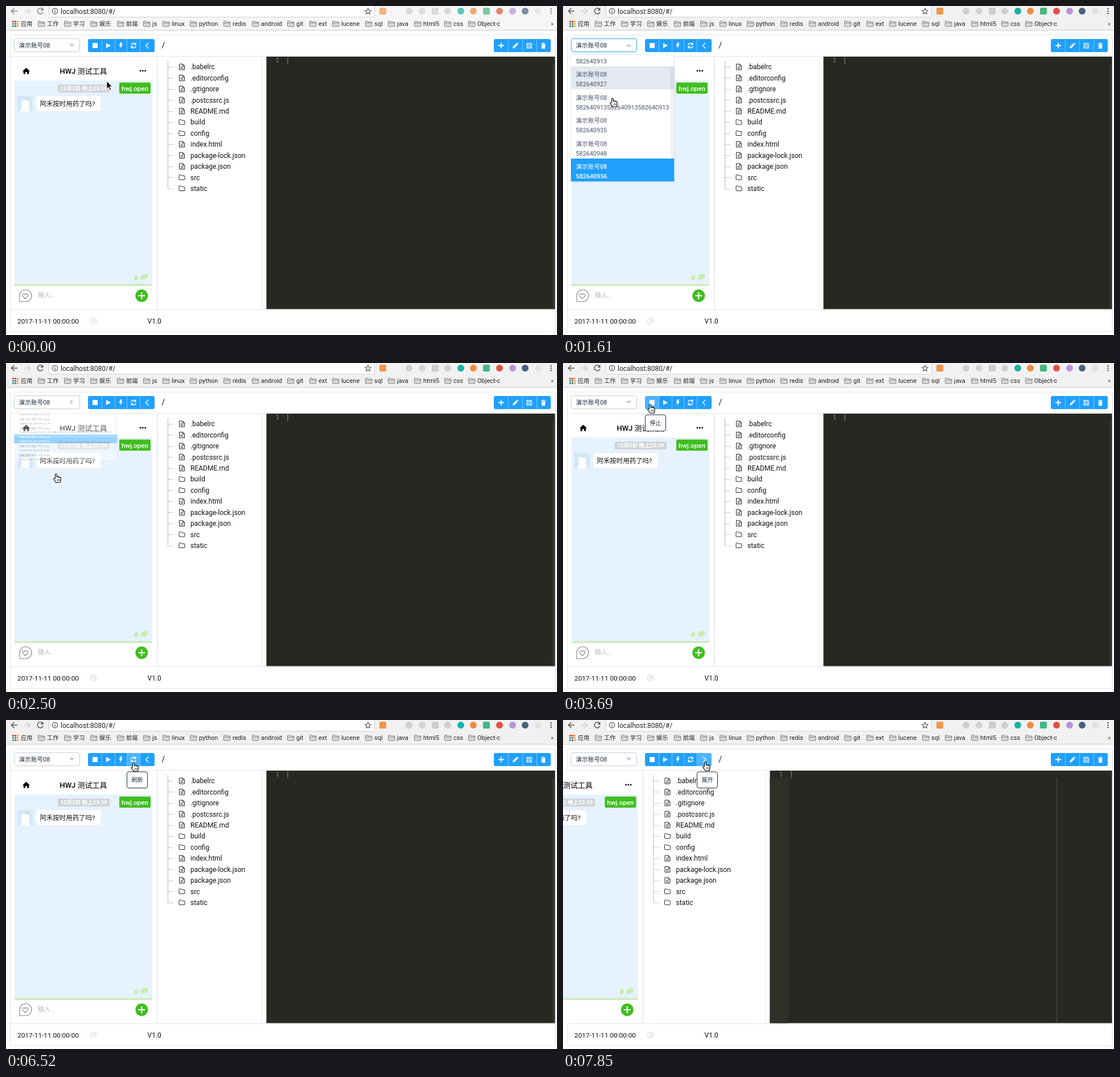
Write an HTML page that moves like this. It is 968 px wide and 578 px high and loops after 8000 ms.

```html
<!DOCTYPE html>
<html lang="zh-CN">
<head>
<meta charset="utf-8">
<title>测试工具</title>
<style>
html, body { margin: 0; width: 100%; height: 100%; overflow: hidden; background: #fff; }
svg { display: block; width: 968px; height: 578px; }
text { font-family: Roboto, "Noto Sans CJK SC", "Noto Sans CJK", sans-serif; white-space: pre; }
.mono { font-family: "Noto Sans Mono", "DejaVu Sans Mono", monospace; }
</style>
</head>
<body>
<svg id="stage" viewBox="0 0 968 578" xmlns="http://www.w3.org/2000/svg"></svg>
<script>
const BLUE = '#20a0ff', HOVER = '#4db3ff', PRESS = '#1d90e6', LINE = '#dfe6ee';
const USER = '演示账号08', APP = 'hwj';
const IDS = ['582640913', '582640927', '582640913'.repeat(3), '582640935', '582640948', '582640956'];

// Markup helpers; text is placed by its vertical centre
const text = (x, y, s, size = 12, fill = '#111', more = '') =>
  `<text x="${x}" y="${y + size * 0.36}" font-size="${size}" fill="${fill}" ${more}>${s}</text>`;
const rect = (x, y, w, h, fill, more = '') =>
  `<rect x="${x}" y="${y}" width="${w}" height="${h}" fill="${fill}" ${more}/>`;
const dot = (x, y, r, fill, more = '') => `<circle cx="${x}" cy="${y}" r="${r}" fill="${fill}" ${more}/>`;
const fill = (d, color, more = '') => `<path d="${d}" fill="${color}" ${more}/>`;
const pen = (d, color, w = 1, more = '') =>
  `<path d="${d}" fill="none" stroke="${color}" stroke-width="${w}" ${more}/>`;
const at = (x, y, body) => `<g transform="translate(${x} ${y})">${body}</g>`;
const group = (id, body, more = '') => `<g id="${id}" ${more}>${body}</g>`;
const MID = 'text-anchor="middle"';

function browser() {
  const logos = [
    [662, '#f0954a', 1], [708, '#cfcfcf'], [731, '#d4d4d4'], [754, '#cdcdcd', 1], [776, '#cfcfcf'],
    [799, '#17b3a3'], [821, '#f08b3d'], [844, '#42b883', 1], [867, '#e4503f'], [890, '#b795dc'],
    [912, '#48627f'], [935, '#e2e2e2']
  ].map(([x, c, square]) => square ? rect(x - 6, 3, 12, 12, c, 'rx="2"') : dot(x, 9, 6, c)).join('');
  const tools =
    pen('M20 9H10M14.500 4L9.500 9L14.500 14', '#555', 1.5) +
    pen('M32 9H42M37.500 4L42.500 9L37.500 14', '#ccc', 1.5) +
    pen('M64.500 6A5 5 0 1 0 65 10.500', '#555', 1.5) + fill('M65.500 3V8H60.500Z', '#555') +
    logos + [5, 9, 13].map(y => dot(957.5, y, 1.3, '#555')).join('');
  const folders = {
    工作: 72, 学习: 118, 娱乐: 164, 前端: 211, js: 257, linux: 291, python: 339, redis: 398,
    android: 448, git: 510, ext: 549, lucene: 589, sql: 647, java: 687, html5: 733, css: 786, 'Object-c': 828
  };
  const marks = Object.entries(folders).map(([name, x]) =>
    at(x - 16, 26, fill('M.5 1.500Q.5.500 1.500.500H4.500L6 2H11Q12 2 12 3V9Q12 10 11 10H1.500Q.5 10 .5 9Z', '#d9d9d9',
      'stroke="#777" stroke-width=".9"') + pen('M.5 4H12', '#777', 0.8)) +
    text(x, 31.5, name, /[a-z]/.test(name) ? 11 : 10.2, '#222')).join('');
  const apps = ['#e0483b', '#e0483b', '#f2a93b', '#4aa25a', '#3e7fe8', '#f2a93b', '#4aa25a', '#3e7fe8', '#f2a93b']
    .map((c, i) => rect(11 + i % 3 * 4, 26 + Math.floor(i / 3) * 4, 3, 3, c)).join('');
  return rect(0, 0, 968, 42, '#f1f1f1', 'id="chrome"') + rect(0, 42, 968, 1, '#c9c9c9') +
    rect(75.5, -6, 572, 25.5, '#fff', 'rx="3" stroke="#cfcfcf"') + group('tools', tools) +
    dot(86, 9, 4.8, 'none', 'stroke="#555" stroke-width="1.200"') + rect(85.4, 8, 1.3, 4, '#555') +
    rect(85.4, 5.8, 1.3, 1.3, '#555') + text(96, 9.5, 'localhost:8080/#/', 12, '#222') +
    pen('M636 4L637.500 7.500L641.300 7.800L638.400 10.300L639.300 14L636 12L632.700 14L633.600 10.300L630.700 7.800L634.500 7.500Z', '#555', 1.1) +
    apps + text(26, 31.5, '应用', 10.2, '#222') + marks + text(957, 31, '»', 11, '#444');
}

const BTN = [144, 168, 191, 212, 235, 261];
function bar() {
  const keys = BTN.slice(0, 5).map((x, i) => rect(x, 58, BTN[i + 1] - x, 23, BLUE, `id="btn${i}"`)).join('');
  const seps = [168, 191, 212, 235, 882, 907, 932].map(x => rect(x, 58, 1, 23, '#7cc6ff')).join('');
  const icons = rect(152, 65, 9, 9, '#fff') + fill('M176 65L184 69.500L176 74Z', '#fff') +
    fill('M201 64H204L202.500 67.800H205L200 75L201 70H198.500Z', '#fff') +
    pen('M219.800 68.500A4.300 4.300 0 0 1 227 66.500M228.200 70.500A4.300 4.300 0 0 1 221 72.500', '#fff', 1.5) +
    fill('M228.500 64V68.500H224ZM219.500 75V70.500H224Z', '#fff') +
    pen('', '#fff', 1.4, 'id="chevron"') +
    pen('M865 69.500H875M870 64.500V74.500', '#fff', 1.8) +
    fill('M890 74.500L890.800 71.300L896.500 65.600L899 68.100L893.300 73.800ZM897.200 64.900L898.200 63.900L900.700 66.400L899.700 67.400Z', '#fff') +
    pen('M915 65.500H922L923.500 67V74H915ZM917 65.500V68.500H921V65.500M917 74V71H921.500V74', '#fff', 1.1) +
    fill('M940 66H948V67.300H940ZM942.500 64.500H945.500V66H942.500ZM940.700 68H947.300L947 75H941Z', '#fff');
  return rect(14.5, 57.5, 115, 23, '#fff', 'id="select" rx="3" stroke="#bfcbd9"') +
    text(22.5, 69.5, USER, 10.7, '#1f2d3d') + fill('M-5 -2.500H5L0 2.500Z', '#bfcbd9', 'id="caret"') +
    `<g clip-path="url(#round)">${keys}</g>` + rect(857, 58, 100, 23, BLUE, 'rx="3"') + seps + icons +
    text(273.5, 69, '/', 14);
}

function chat() {
  const avatar = rect(20, 158, 27, 27, '#d3e8f8') +
    fill('M25 185Q27 180 28 176Q24 165 34 165Q43 165 40 176Q42 180 42 185Z', '#fff') +
    fill('M33 165Q34 161 40 162Q38 166 33 165Z', '#bfe5a0');
  return rect(7, 89, 1, 444, LINE) + rect(265, 89, 1.5, 444, LINE) +
    fill('M29 114.500L35.500 108.500L42 114.500H40.300V119.500H37V116H34V119.500H30.700V114.500Z', '#000') +
    text(136, 114.5, APP.toUpperCase() + ' 测试工具', 13, '#000', MID + ' font-weight="500"') +
    [236, 240.3, 244.6].map(x => dot(x, 113.7, 1.5, '#111')).join('') +
    rect(15, 131, 242, 361, '#e6f2fe') + rect(15, 488.5, 242, 3.5, '#cdecc0') +
    `<g fill="#c8edae"><ellipse cx="229" cy="477.500" rx="3.700" ry="4.700" transform="rotate(25 229 477)"/>
    <ellipse cx="243" cy="475.500" rx="7" ry="4.500" transform="rotate(-25 243 475)"/></g>` +
    pen('M237 479Q236 484 236.500 489', '#d3efc4') +
    rect(91, 138, 91, 14, '#d2d5d8', 'rx="2"') +
    text(136.5, 145, '12月2日 晚上23:39', 9.6, '#fff', MID + ' font-weight="700"') +
    rect(199, 134.5, 55, 19.5, '#3fbe1f', 'rx="2"') +
    text(226.5, 144.5, APP + '.open', 11.6, '#fff', MID + ' font-weight="500"') + avatar +
    rect(53, 158, 114, 27, '#fff', 'rx="2" stroke="#dfe9f2" stroke-width=".6"') +
    fill('M53.500 168.500L49.500 171.500L53.500 174.500Z', '#fff') + text(59.5, 172, '阿禾按时用药了吗?', 11.45) +
    pen('M24 519.500V509A10.500 10.500 0 1 1 34.500 519.500Z', '#8c8c8c', 1.2) +
    pen('M34 514.500L29.700 510Q28 506.500 31 505.500Q33 505.200 34 507.300Q35 505.200 37 505.500Q40 506.500 38.300 510Z', '#8c8c8c', 1.2) +
    text(56, 508.5, '输入...', 11, '#b5b5b5') +
    dot(238.3, 509, 11, '#3fbe1f') + pen('M232.300 509H244.300M238.300 503V515', '#fff', 2.2);
}

function tree() {
  const names = ['.babelrc', '.editorconfig', '.gitignore', '.postcssrc.js', 'README.md', 'build', 'config',
    'index.html', 'package-lock.json', 'package.json', 'src', 'static'];
  const file = pen('M.5.500H6.500L9.500 3.500V10.500H.5ZM6.500.500V3.500H9.500M2.500 5.500H7.500M2.500 8H7.500', '#222');
  const folder = pen('M.5 2Q.5 1 1.500 1H4L5.500 2.500H9.500Q10.500 2.500 10.500 3.500V8.500Q10.500 9.500 9.500 9.500H1.500Q.5 9.500 .5 8.500Z', '#222');
  return pen('M284.500 97V321', '#999', 1, 'stroke-dasharray="1.500 .7"') + names.map((name, i) => {
    const y = 107 + i * 19.42;
    return pen(`M285 ${Math.round(y) + 0.5}H295`, '#999', 1, 'stroke-dasharray="1 1"') +
      (name.includes('.') ? at(304, y - 5.5, file) : at(303.5, y - 5.5, folder)) + text(324, y, name);
  }).join('');
}

const ROW = 40.5, TOP = 65.5;
function menu() {
  const rows = IDS.map((id, i) => {
    const y = TOP + i * ROW;
    return `<g id="row${i}">` + rect(14, y, 181.5, ROW, '#fff') +
      text(22.5, y + 14.3, USER, 10.7, 'inherit') + text(22.5, y + 31.5, id, 10.8, 'inherit') + '</g>';
  }).join('');
  return rect(15, 88, 181.5, 222, '#000', 'rx="2" opacity=".08"') +
    rect(14, 86, 181.5, 222.5, '#fff', 'rx="2" stroke="#d1dbe5"') +
    `<g clip-path="url(#list)">${rows}${rect(189, 106, 6, 161, '#8a94a6', 'opacity=".13"')}</g>`;
}

// label, left edge, fade-in start and end, fade-out start and end
const TIPS = [
  ['停止', 144, 3390, 3600, 4300, 4500],
  ['运行', 168, 4450, 4700, 5000, 5300],
  ['事件', 191, 4950, 5200, 6150, 6350],
  ['刷新', 212, 6250, 6450, 6850, 7100],
  ['收起', 235, 6880, 7100, 9000, 9100]
];
const tips = TIPS.map(([s, x], i) => group('tip' + i,
  rect(x + 0.5, 91, 36, 28.5, '#fff', 'rx="3.500" stroke="#1f2d3d"') +
  text(x + 18.5, 105.5, s, 10, '#1f2d3d', MID + ` id="word${i}"`))).join('');

const arrow = fill('M0 0V13.500L3.200 10.600L5.400 15.600L7.600 14.600L5.400 9.800H9.500Z', '#000', 'stroke="#fff" stroke-width=".9"');
const hand = fill('M-1.500 8V1.200a1.400 1.400 0 0 1 2.800 0V5.500a1.200 1.200 0 0 1 2.400.300a1.200 1.200 0 0 1 2.300.500' +
  'a1.100 1.100 0 0 1 2.100.600V10.500Q8 12 7.300 15H-.2Q-1.200 12.500 -4 9.600Q-4.500 7.600 -2.800 7.800Z',
  '#fff', 'stroke="#000" stroke-width="1.100" stroke-linejoin="round"') + pen('M2 9V12.500M4 9V12.500M6 9V12.500', '#000', 0.7);

document.getElementById('stage').innerHTML =
  `<defs><clipPath id="round"><rect x="144" y="58" width="117" height="23" rx="3"/></clipPath>
  <clipPath id="list"><rect x="14" y="86.500" width="181.500" height="221.500"/></clipPath></defs>` +
  rect(0, 0, 968, 578, '#fff') + browser() +
  pen('M7.500 88V53Q7.500 51 9.500 51H963Q965 51 965 53V572H9.500Q7.500 572 7.500 570V533.500', LINE) +
  group('chat', chat()) + group('tree', tree()) + rect(449.5, 89, 1, 444, LINE, 'id="edge"') +
  group('editor', rect(457.5, 89, 602, 443.5, '#272822') + rect(457.5, 102, 33, 430.5, '#2f3129', 'id="gutter"') +
    text(474, 95.5, '1', 10, '#8f908a', 'class="mono"') + rect(494.5, 90, 1, 12, '#8d8d87') +
    rect(961, 102, 1, 430.5, '#4b4c46')) +
  rect(965, 86, 3, 450, '#fff') + rect(964.5, 51, 1, 521, LINE) +
  rect(7, 88, 958, 1, LINE) + rect(7, 533, 958, 1, LINE) + bar() +
  text(20, 553.5, '2017-11-11 00:00:00', 11.8) + dot(153.5, 553, 5, 'none', 'stroke="#c0ccda"') +
  pen('M153.500 550V553.500H156.500', '#c0ccda') + text(248.5, 553.5, 'V1.0') +
  group('menu', menu()) + tips + group('pointer', group('arrow', arrow) + group('hand', hand));

// Moments at which the picture may change: first, last, count
const BURSTS = [[140, 590, 4], [880, 1910, 8], [2060, 3090, 8], [3240, 3690, 4], [3990, 5030, 8],
  [5180, 5330, 2], [5780, 6810, 8], [6960, 7110, 2], [7560, 7850, 3]];
const TICKS = [0].concat(...BURSTS.map(([a, b, n]) =>
  Array.from({ length: n }, (_, i) => Math.floor((a + (b - a) * i / (n - 1)) / 10 + 1e-6) * 10)));

// Pointer path: time, x, y
const PATH = [[0, 177, 132], [140, 172, 122], [290, 130, 92], [440, 95, 70], [590, 86, 63], [1020, 86, 64],
  [1610, 87, 162], [2350, 88, 195], [2500, 88, 195], [3090, 146, 117], [3390, 153, 76], [3690, 153, 73],
  [3980, 153, 73], [4440, 172, 74], [4870, 181, 75], [5030, 192, 76], [5330, 196, 76], [5770, 196, 76],
  [6220, 213, 75], [6660, 230, 75], [6810, 240, 74], [7110, 250, 74], [8000, 250, 74]];

const ramp = (t, a, b) => Math.min(1, Math.max(0, (t - a) / (b - a)));
const easeOut = p => 1 - (1 - p) ** 4;
const $ = id => document.getElementById(id);
const set = (id, name, value) => $(id).setAttribute(name, value);
const move = (id, x, y = 0) => set(id, 'transform', `translate(${x} ${y})`);
const show = (id, on) => set(id, 'opacity', +on);

function pos(t) {
  const i = Math.max(1, PATH.findIndex(p => p[0] >= t));
  const [a, b] = [PATH[i - 1], PATH[i]], k = ramp(t, a[0], b[0]);
  return [a[1] + (b[1] - a[1]) * k, a[2] + (b[2] - a[2]) * k];
}

function draw(t) {
  const [x, y] = pos(t), isHand = (t >= 430 && t < 2600) || t >= 3380;
  move('pointer', x, y);
  show('hand', isHand);
  show('arrow', !isHand);

  const active = t >= 430;
  set('chrome', 'fill', active ? '#f1f1f1' : '#f6f6f6');
  set('tools', 'opacity', active ? 1 : 0.7);

  const picked = t >= 2437;
  const open = easeOut(ramp(t, 860, 1160)) * (1 - easeOut(ramp(t, 2437, 2737)));
  set('menu', 'transform', `translate(0 ${86 * (1 - open)}) scale(1 ${Math.max(open, 0.001)})`);
  set('menu', 'opacity', open < 0.02 ? 0 : open);
  set('caret', 'transform', `translate(115.500 69) rotate(${-180 * open})`);
  set('select', 'stroke', t >= 880 && !picked ? BLUE : '#bfcbd9');
  const over = Math.floor((pos(t - 150)[1] - TOP) / ROW), chosen = picked ? 3 : 5;
  IDS.forEach((_, i) => {
    const row = $('row' + i), on = i === chosen;
    row.firstChild.setAttribute('fill', on ? BLUE : i === over && t > 1150 ? '#e4e8f1' : '#fff');
    row.setAttribute('fill', on ? '#fff' : '#48576a');
    row.setAttribute('font-weight', on ? 500 : 400);
  });

  for (let i = 0; i < 5; i++) {
    const hot = t > 3380 && x >= BTN[i] && x < BTN[i + 1];
    set('btn' + i, 'fill', !hot ? BLUE : t >= 7560 && t < 7700 ? PRESS : HOVER);
    const [, , a, b, c, d] = TIPS[i];
    set('tip' + i, 'opacity', ramp(t, a, b) * (1 - ramp(t, c, d)));
  }
  const folded = t >= 7700;
  $('word4').textContent = folded ? '展开' : '收起';
  set('chevron', 'd', folded ? 'M246 64.500L251 69.500L246 74.500' : 'M250.500 64.500L245.500 69.500L250.500 74.500');

  const k = ramp(t, 7660, 7850) ** 1.35;
  move('chat', -125.5 * k);
  move('tree', -125.5 * k);
  move('edge', -94 * k);
  move('editor', -94 * k);
  show('gutter', k > 0);
}

const start = performance.now();
let last = -1;
function tick() {
  const t = Math.max(0, performance.now() - start) % 8000;
  const now = TICKS.filter(s => s <= t).pop();
  if (now !== last) draw(last = now);
  requestAnimationFrame(tick);
}
draw(0);
tick();
</script>
</body>
</html>
```
